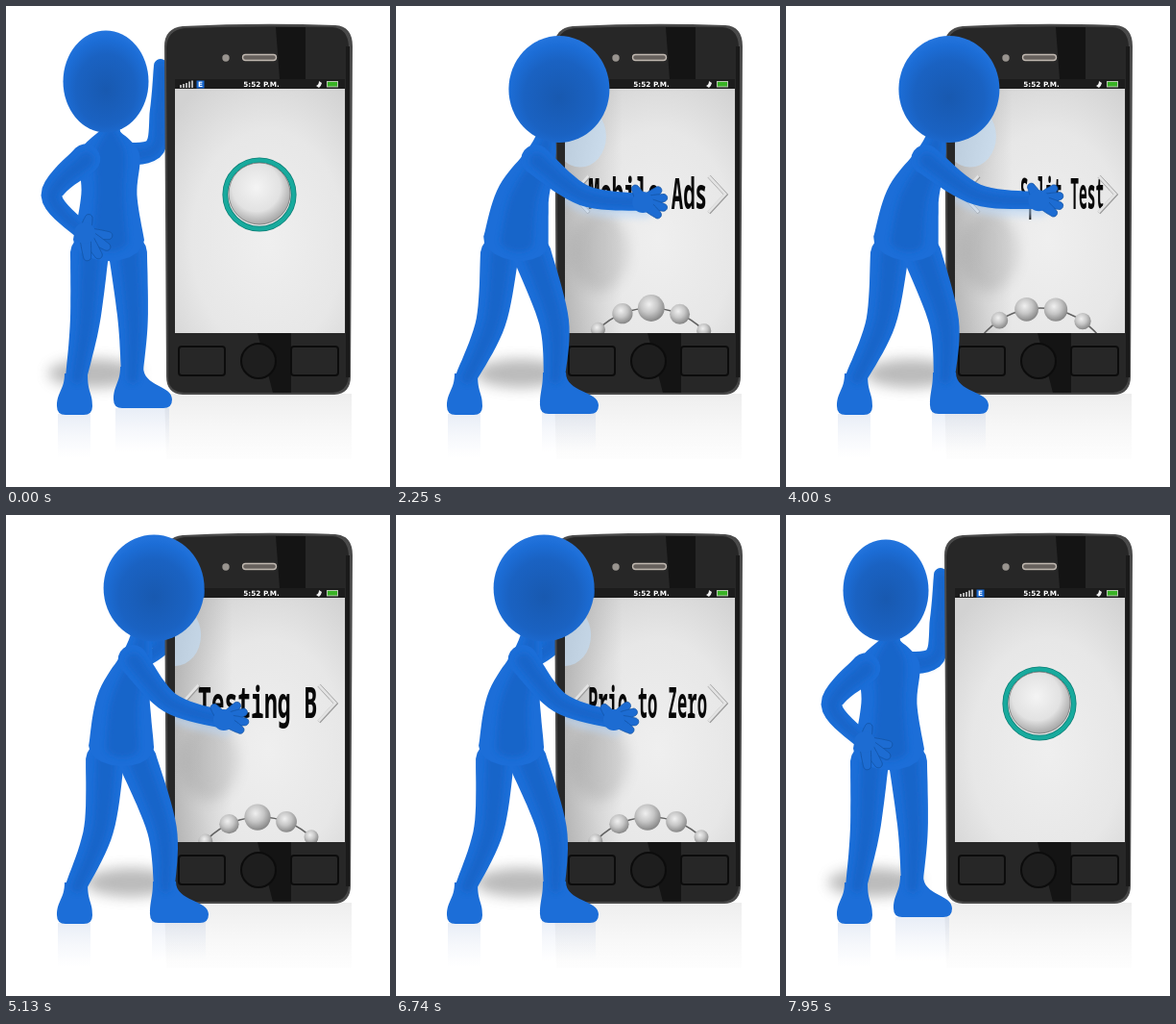
Recreate the animation shown at these times as an HTML page. Size 400x500 px, loop 8 s.

```html
<!DOCTYPE html>
<html lang="en">
<head>
<meta charset="utf-8">
<title>Mobile swipe</title>
<style>
html, body { margin: 0; width: 100%; height: 100%; overflow: hidden; background: #fff; }
svg { display: block; width: 100vw; height: 100vh; }
#label { font: bold 44px "Noto Sans Mono", "DejaVu Sans Mono", monospace; }
.bar { font: bold 7.3px "DejaVu Sans", "Open Sans", sans-serif; fill: #fff; }
</style>
</head>
<body>
<svg id="stage" viewBox="0 0 400 500">
  <defs>
    <radialGradient id="headFill" cx=".5" cy=".58" r=".58">
      <stop offset="0" stop-color="#1859b0"/><stop offset=".6" stop-color="#1a62c2"/>
      <stop offset=".85" stop-color="#1c6dd6"/><stop offset="1" stop-color="#2475de"/>
    </radialGradient>
    <radialGradient id="ballFill" cx=".45" cy=".4" r=".6">
      <stop offset="0" stop-color="#f4f4f4"/><stop offset=".65" stop-color="#e2e2e2"/><stop offset="1" stop-color="#a8a8a8"/>
    </radialGradient>
    <radialGradient id="beadFill" cx=".42" cy=".36" r=".65">
      <stop offset="0" stop-color="#f0f0f0"/><stop offset=".5" stop-color="#c6c6c6"/><stop offset="1" stop-color="#858585"/>
    </radialGradient>
    <radialGradient id="screenFill" cx=".55" cy=".62" r=".75">
      <stop offset="0" stop-color="#efefef"/><stop offset=".6" stop-color="#e7e7e7"/><stop offset="1" stop-color="#d2d2d2"/>
    </radialGradient>
    <linearGradient id="shade">
      <stop offset="0" stop-color="#333" stop-opacity=".22"/><stop offset="1" stop-color="#333" stop-opacity="0"/>
    </linearGradient>
    <linearGradient id="mirror" x2="0" y2="1">
      <stop offset="0" stop-color="#777" stop-opacity=".13"/><stop offset="1" stop-color="#aaa" stop-opacity=".02"/>
    </linearGradient>
    <linearGradient id="footMirror" x2="0" y2="1">
      <stop offset="0" stop-color="#6f8fc8" stop-opacity=".16"/><stop offset="1" stop-color="#a0b4dc" stop-opacity="0"/>
    </linearGradient>
    <filter id="soft" x="-40%" y="-40%" width="180%" height="180%"><feGaussianBlur stdDeviation="3"/></filter>
    <filter id="wide" x="-40%" y="-80%" width="180%" height="260%"><feGaussianBlur stdDeviation="7"/></filter>
    <clipPath id="view"><rect x="176" y="86" width="177" height="254"/></clipPath>
  </defs>

  <path d="M165 403H360V471H167Z" fill="url(#mirror)"/>
  <ellipse id="ground" cy="382" rx="48" ry="15" fill="#555" opacity=".4" filter="url(#wide)"/>
  <rect id="mirrorL" x="54" y="424" width="34" height="46" fill="url(#footMirror)"/>
  <rect id="mirrorR" y="418" width="56" height="46" fill="url(#footMirror)"/>
  <g id="back"></g>

  <g id="phone">
    <path d="M184 21Q263 17 343 20Q361 21 361 42L359 385Q359 403 342 404H184Q167 403 167 385L165 42Q165 23 184 21Z" fill="#4a4a4a"/>
    <path d="M186 23Q263 20 340 22Q356 23 357 42V386Q355 401 340 402H186Q169 401 169 386L167 43Q168 25 186 23Z" fill="#272727"/>
    <path d="M281 22H312V76H285ZM262 340H297V402H278Z" fill="#141414"/>
    <path d="M356 42V386" stroke="#1a1a1a" stroke-width="4"/>
    <circle cx="229" cy="54" r="3.7" fill="#99948f"/>
    <rect x="246.500" y="50.500" width="35" height="6" rx="3" fill="#67615d" stroke="#c0b8b0" stroke-width="1.300"/>
    <g fill="none" stroke="#0c0c0c" stroke-width="2">
      <rect x="180" y="354" width="48" height="30" rx="3"/><rect x="297" y="354" width="49" height="30" rx="3"/>
      <circle cx="263" cy="369" r="18" fill="#1e1e1e"/>
    </g>
    <rect x="176" y="76" width="177" height="10.500" fill="#1c1c1c"/>
    <path d="M182 85V82M185 85V81M188 85V80M191 85V78.500M194 85V77.500" stroke="#ccc" stroke-width="1.700"/>
    <rect x="198.500" y="77.500" width="8" height="8" fill="#1767cf"/>
    <text class="bar" x="202.500" y="84.300" text-anchor="middle">E</text>
    <text class="bar" x="266" y="84.200" text-anchor="middle">5:52 P.M.</text>
    <path d="M323 83Q326 82 326 78L329 80Q328 84 326 85Z" fill="#eee"/>
    <rect x="334.500" y="78.500" width="11" height="5.500" fill="#39b325" stroke="#b8c8b0"/>
  </g>

  <g clip-path="url(#view)">
    <rect x="176" y="86" width="177" height="254" fill="url(#screenFill)"/>
    <g id="bodyShade">
      <rect x="176" y="86" width="60" height="254" fill="url(#shade)"/>
      <ellipse cx="212" cy="255" rx="30" ry="42" fill="#555" opacity=".16" filter="url(#wide)"/>
    </g>
    <g id="button">
      <circle r="35.700" fill="#e6e6e6" stroke="#0c7f76" stroke-width="5.800"/>
      <circle r="35.700" fill="none" stroke="#18aa9d" stroke-width="4.200"/>
      <circle r="32" cy="-1" fill="url(#ballFill)" stroke="#777" stroke-width=".8"/>
      <circle id="pressed" cx="1" r="32.500" fill="#dcdcdc" stroke="#3f3f3f" stroke-width="1.500"/>
    </g>
    <text id="label" text-anchor="middle" fill="#080808"></text>
    <g id="menu">
      <g fill="none">
        <path d="M201 177L184 196L201 215M326 177L343.500 196L326 215" stroke="#999" stroke-width="4"/>
        <path d="M200.500 176.500L183.500 195.500L200.500 214.500M325.500 176.500L343 195.500L325.500 214.500" stroke="#e3e3e3" stroke-width="2.800"/>
      </g>
      <circle cx="265" cy="392" r="78" fill="none" stroke="#626262" stroke-width="1.500"/>
      <g id="beads"></g>
    </g>
    <ellipse id="headGlass" rx="27" ry="32" fill="#c4e0fa"/>
    <path id="armGlass" fill="#b5d4f7" filter="url(#soft)"/>
  </g>
  <g id="front"></g>
</svg>

<script>
const LOOP = 8000, NS = 'http://www.w3.org/2000/svg';
const $ = id => document.getElementById(id);
const mix = (a, b, u) => a + (b - a) * u;
const mixPt = (a, b, u) => a.map((v, i) => mix(v, b[i], u));
const shift = ([x, y], dx, dy) => [x + dx, y + dy];
const smooth = u => u * u * (3 - 2 * u);
const set = (el, attrs) => { for (const k in attrs) el.setAttribute(k, attrs[k]); };
const make = (tag, parent, attrs) => {
  const el = parent.appendChild(document.createElementNS(NS, tag));
  set(el, attrs);
  return el;
};

// turn: 0 faces the viewer, 1 faces the phone. The rig derives the rest.
const poses = {
  idle:  { turn: 0, head: [104, 78.5],  hip: [107, 243], hand: [82, 236],  aim: 45 },
  press: { turn: 1, head: [177, 80.5],  hip: [122, 243], hand: [242, 202], aim: -25 },
  reach: { turn: 1, head: [173.5, 89],  hip: [126, 245], hand: [264, 202], aim: 3 },
  rest:  { turn: 1, head: [150.5, 73.5], hip: [119, 240], hand: [220, 215], aim: -10 }
};
const pages = ['', 'Mobile Ads', 'Split Test', 'Testing B', 'Prio to Zero', ''];

// Each move is a run of hard steps; flip turns to the next page.
const moves = [];
const move = (start, span, steps, from, to, flip = 0) => moves.push({ start, span, steps, from, to, flip });
move(100, 520, 6, 'idle', 'press');
move(800, 330, 4, 'press', 'rest', 1);
for (const start of [1930, 3520, 5130, 6740]) {
  move(start, 330, 4, 'rest', 'reach');
  move(start + 475, 320, 4, 'reach', 'rest', 1);
}
move(7635, 315, 4, 'rest', 'idle');

// Outline of a tapered limb through [x, y, radius] knots.
function limb(knots, k = 1, cap = 1, dx = 0, dy = 0) {
  const n = knots.length, pts = [], left = [], right = [], caps = [];
  const at = i => knots[Math.max(0, Math.min(n - 1, i))];
  for (let j = 0; j <= (n - 1) * 10; j++) {
    const i = Math.floor(j / 10), u = j % 10 / 10;
    pts.push(at(i).map((b, c) => {
      const a = at(i - 1)[c], d = at(i + 1)[c], e = at(i + 2)[c];
      return b + .5 * u * (d - a + u * (2 * a - 5 * b + 4 * d - e + u * (3 * (b - d) + e - a)));
    }));
  }
  const last = pts.length - 1;
  pts.forEach(([x, y, r], i) => {
    const a = pts[Math.max(0, i - 1)], b = pts[Math.min(last, i + 1)];
    const ang = Math.atan2(b[1] - a[1], b[0] - a[0]);
    const tx = Math.cos(ang), ty = Math.sin(ang), w = r * k;
    left.push([x - ty * w, y + tx * w]);
    right.unshift([x + ty * w, y - tx * w]);
    if (i === 0 || i === last) {
      const sign = i ? 1 : -1, c = i ? cap : 1;
      caps.push(Array.from({ length: 9 }, (_, q) => {
        const h = Math.PI * (q + 1) / 10, s = Math.cos(h) * w * sign, f = Math.sin(h) * w * sign * c;
        return [x - ty * s + tx * f, y + tx * s + ty * f];
      }));
    }
  });
  return 'M' + [...left, ...caps[1], ...right, ...caps[0]]
    .map(([x, y]) => (x + dx).toFixed(1) + ' ' + (y + dy).toFixed(1)).join('L') + 'Z';
}

// Flat-soled foot around ankle x, from heel x0 to toe x1, on ground b.
const foot = (x, x0, x1, b) =>
  `M${x - 12} ${b - 43}C${x - 12} ${b - 26} ${x0} ${b - 24} ${x0} ${b - 9}Q${x0} ${b} ${x0 + 9} ${b}` +
  `H${x1 - 9}Q${x1} ${b} ${x1} ${b - 9}C${x1} ${b - 24} ${x + 12} ${b - 22} ${x + 12} ${b - 43}Z`;

const BLUE = '#1c6ed8';
function part(parent) {
  const body = make('path', parent, { fill: BLUE });
  const core = make('path', parent, { fill: '#1862c4', opacity: .75, filter: 'url(#soft)' });
  return (knots, cap) => {
    set(body, { d: limb(knots, 1, cap) });
    set(core, { d: limb(knots, .5, cap, 1, 1) });
  };
}

const front = $('front');
const farArm = part($('back'));
const feet = [0, 1].map(() => make('path', front, { fill: BLUE }));
const legs = [0, 1].map(() => part(front));
const torso = part(front), arm = part(front);
const fingers = Array.from({ length: 5 }, () =>
  make('path', front, { fill: '#1d6cd2', stroke: '#1453a4', 'stroke-width': .8 }));
const palm = make('circle', front, { r: 11, fill: '#1d6cd2' });
const head = make('ellipse', front, { fill: 'url(#headFill)' });
const beads = Array.from({ length: 7 }, () => make('circle', $('beads'), { fill: 'url(#beadFill)' }));

function drawFigure({ turn, head: top, hip, hand, aim }) {
  const neck = shift(top, mix(4, -14, turn), 52);
  const chest = mixPt(neck, hip, .2);
  const waist = shift(mixPt(neck, hip, .58), -6 * turn, 0);
  torso([[...neck, 11], [...chest, mix(31, 17, turn)], [...waist, mix(29, 28, turn)], [...hip, mix(37, 34, turn)]], .6);

  const ankles = [73, mix(131, 165, turn)];
  const soles = [53, mix(112, 150, turn)];
  ankles.forEach((x, i) => {
    const thigh = shift(hip, (i ? 1 : -1) * mix(20, 17, turn), 14);
    const ankle = [x, 386], knee = shift(mixPt(thigh, ankle, .55), mix(3, 10, turn), 0);
    legs[i]([[...thigh, 20], [...knee, 15.5], [...ankle, 11]], 1);
    set(feet[i], { d: foot(x, soles[i], soles[i] + (i ? 61 : 37), i ? mix(418, 424, turn) : 425) });
  });

  const shoulder = shift(chest, mix(-25, -4, turn), mix(6, 0, turn));
  const dx = hand[0] - shoulder[0], dy = hand[1] - shoulder[1], reach = Math.hypot(dx, dy);
  const bow = Math.sqrt(Math.max(256, mix(52, 58, turn) ** 2 - reach * reach / 4)) / reach;
  const elbow = shift(mixPt(shoulder, hand, .5), -dy * bow, dx * bow);
  const bones = [[...shoulder, 15.5], [...elbow, 11], [...hand, 9]];
  arm(bones, 1);

  set(palm, { cx: hand[0], cy: hand[1] });
  fingers.forEach((f, i) => {
    const thumb = i === 4, size = thumb ? 20 : mix(32, 27, turn) - Math.abs(i - 1.5) * 2;
    const a = (aim + (thumb ? -120 : (i - 1.5) * 26)) * Math.PI / 180;
    const out = d => shift(hand, Math.cos(a) * d, Math.sin(a) * d);
    set(f, { d: limb([[...hand, 6], [...out(size * .55), 5], [...out(size - 4), 4]]) });
  });

  farArm([[...chest, 12], [mix(153, 160, turn), mix(149, 136, turn), 11],
    [159, mix(108, 128, turn), 9], [mix(161, 175, turn), mix(62, 112, turn), 7]], 1);

  set(head, { cx: top[0], cy: top[1], rx: mix(44.5, 52.5, turn), ry: mix(53, 55.5, turn) });
  set($('ground'), { cx: mix(92, 130, turn) });
  set($('mirrorR'), { x: soles[1] + 2 });
  set($('bodyShade'), { opacity: turn });
  set($('headGlass'), { cx: top[0] + 22, cy: top[1] + 49, opacity: .6 * turn });
  set($('armGlass'), { d: limb(bones, .9, 1, 2, 9), opacity: .5 * turn });
}

function drawScreen(page, flip, wheel, menu, press) {
  const word = pages[page], a = flip * Math.PI / 180;
  const x = 36 * Math.sin(a), squash = Math.max(.001, Math.cos(a));
  const label = $('label');
  if (label.textContent !== word) label.textContent = word;
  set(label, { transform: `translate(${262 + x} 211) scale(${124 / (26.4 * (word.length || 1)) * squash} 1)` });
  set($('button'), { transform: `translate(${264 + x} 196) scale(${squash} 1)`, opacity: word ? 0 : 1 });
  set($('pressed'), { opacity: press });
  set($('menu'), { opacity: menu });
  beads.forEach((bead, i) => {
    const deg = wheel % 22.5 + (i - 3) * 22.5, r = deg * Math.PI / 180;
    set(bead, {
      cx: 265 + 78 * Math.sin(r), cy: 392 - 78 * Math.cos(r),
      r: 7.5 + 6.5 * Math.max(0, 1 - Math.abs(deg) / 42)
    });
  });
}

function render(t) {
  const done = moves.filter(m => m.start <= t);
  const m = done[done.length - 1] || { start: 0, span: 1, steps: 1, from: 'idle', to: 'idle', flip: 0 };
  const step = Math.min(m.steps, Math.floor((t - m.start) / m.span * (m.steps - 1) + .02) + 1);
  const u = step / m.steps, e = smooth(u), a = poses[m.from], b = poses[m.to];
  const swipe = m.from === 'reach';

  // The hand stays on the glass while the body already leans back.
  const pose = {
    turn: mix(a.turn, b.turn, e),
    head: mixPt(a.head, b.head, e),
    hip: mixPt(a.hip, b.hip, e),
    hand: mixPt(a.hand, b.hand, swipe ? u ** 3 : e),
    aim: mix(a.aim, b.aim, e)
  };
  if (a.turn !== b.turn) pose.head[1] -= 5 * Math.sin(Math.PI * e);
  drawFigure(pose);

  const flips = done.filter(d => d.flip).length, angle = m.flip * 180 * u;
  const late = m.flip && angle < 90;
  const wheel = swipe ? mix(2, 41.4, u) : m.to === 'reach' ? mix(-3.6, 2, u) : -3.6;
  const first = flips === 1 && m.flip, closing = flips === pages.length - 1;
  const menu = flips === 0 ? 0 : closing ? (m.flip ? 1 - u : 0) : first ? u : 1;
  const press = m.to === 'press' ? Math.max(0, u * 3 - 2) : m.from === 'press' ? 1 : 0;
  drawScreen(late ? flips - 1 : flips, angle > 0 && !late ? angle - 180 : angle, wheel, menu, press);
}

const began = performance.now();
function tick() {
  render((performance.now() - began) % LOOP);
  requestAnimationFrame(tick);
}
tick();
</script>
</body>
</html>
```
